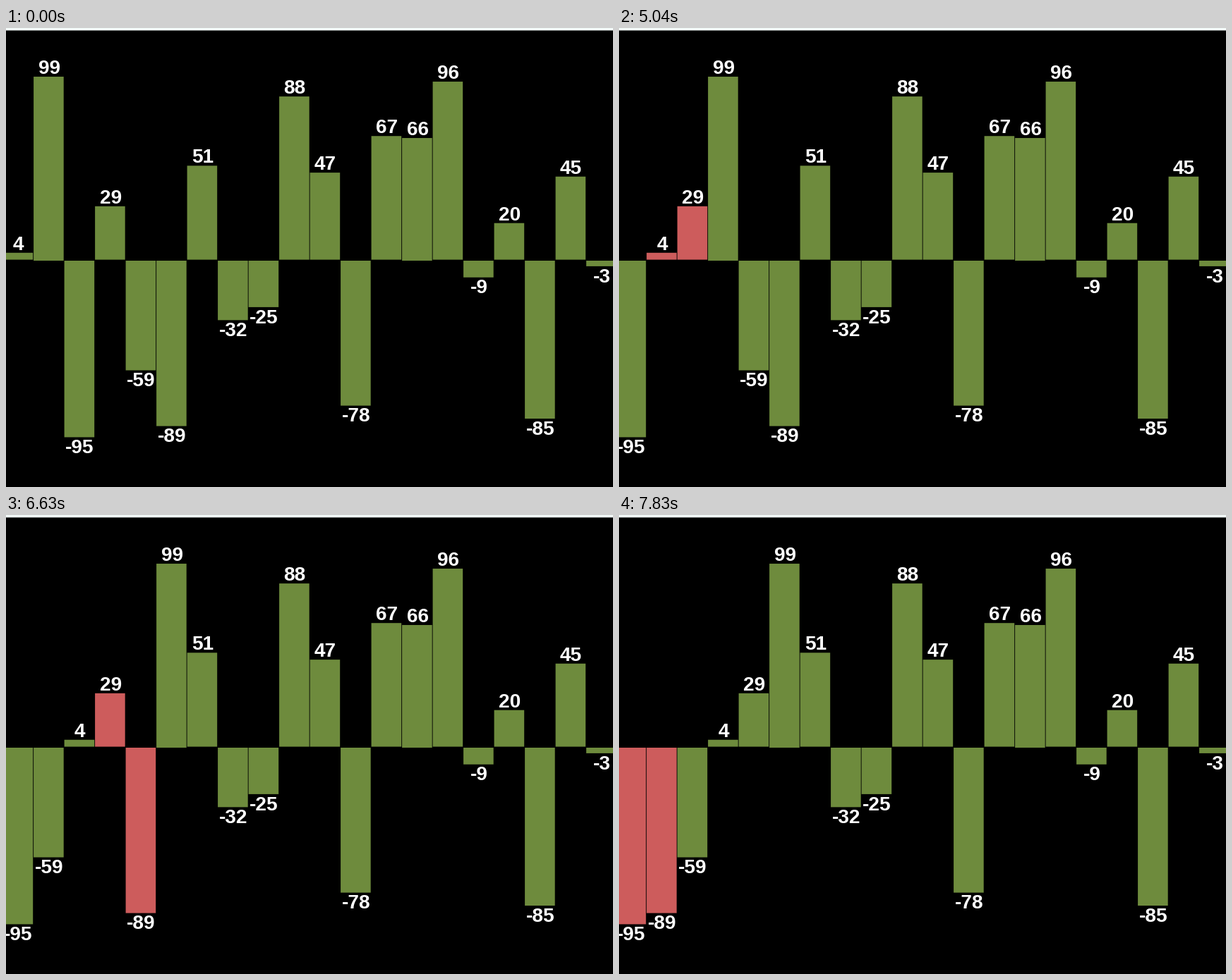
A matplotlib script for the animation above (8 s loop, 860x651 px).

```python
import numpy as np
import matplotlib.pyplot as plt
from matplotlib.animation import FuncAnimation
from matplotlib.patches import Polygon, Rectangle

W, H, DPI = 860, 651, 64
LOOP, TICK = 8000, 20
GREEN, RED = "#6e8b3d", "#cd5c5c"
PITCH, BAR_W, LEFT = 43.5, 42.6, -4.4
MID, ZOOM, UNIT = 330, 1.403, 62 / 33

VALUES = [4, 99, -95, 29, -59, -89, 51, -32, -25, 88,
          47, -78, 67, 66, 96, -9, 20, -85, 45, -3]
STEP_TIMES = [4240, 4640, 5040, 5440, 5830, 6240, 6630, 7030, 7430, 7830]


def insertion_steps(values):
    """Yield (list, highlighted indices) after every swap."""
    a = list(values)
    for i in range(1, len(a)):
        while i > 0 and a[i - 1] > a[i]:
            a[i - 1], a[i] = a[i], a[i - 1]
            i -= 1
            yield list(a), {i - 1, i}


def bar_span(v):
    """Top and bottom of a bar, cut to whole cells before zooming."""
    size = round(abs(v) * UNIT, 6)
    if v < 0:
        return MID, MID + size * ZOOM
    top = np.ceil(size)
    return MID - top * ZOOM, MID - (top - np.floor(size)) * ZOOM


def pointer_x(t):
    """Pointer peeks in from the left edge, rests and leaves."""
    if not 910 <= t < 1640:
        return -40
    into = np.interp(t, [910, 1240], [0.25, 1])
    away = np.interp(t, [1510, 1640], [0, 1])
    return -16 + 12 * (1 - (1 - into) ** 2) - 12 * away


states = [(VALUES, set())]
for state, _ in zip(insertion_steps(VALUES), STEP_TIMES):
    states.append(state)

plt.rcParams["font.family"] = "Liberation Sans"
fig = plt.figure(figsize=(W / DPI, H / DPI), dpi=DPI, facecolor="black")
ax = fig.add_axes([0, 0, 1, 1])
ax.set_xlim(0, W)
ax.set_ylim(H, 0)
ax.axis("off")
ax.add_patch(Rectangle((0, 0), W, 3.5, fc="#f3fbf9", lw=0, snap=False))

bars, labels = [], []
for k in range(len(VALUES)):
    x = LEFT + PITCH * k
    bars.append(ax.add_patch(Rectangle((x, MID), BAR_W, 0, lw=0, snap=False)))
    labels.append(ax.text(x + 22, 0, "", color="white", weight="bold",
                          fontsize=28 * 72 / DPI, ha="center", va="baseline"))

ARROW = np.array([(0, 0), (0, 22), (5, 17.5), (9, 27), (12.5, 25.5),
                  (8.5, 16), (15, 16)])
pointer = ax.add_patch(Polygon(ARROW, fc="black", ec="white", lw=1.2, zorder=5))


def draw(n):
    t = n * TICK + TICK - 1
    values, marked = states[sum(t >= s for s in STEP_TIMES)]
    for k, (v, bar, label) in enumerate(zip(values, bars, labels)):
        top, bottom = bar_span(v)
        bar.set_y(top)
        bar.set_height(bottom - top)
        bar.set_facecolor(RED if k in marked else GREEN)
        label.set_text(str(v))
        label.set_y(bottom + 22.7 if v < 0 else top - 4)
    pointer.set_xy(ARROW + (pointer_x(t), 622))
    return [*bars, *labels, pointer]


anim = FuncAnimation(fig, draw, frames=LOOP // TICK, interval=TICK,
                     repeat=True, repeat_delay=0, blit=False)
plt.show()
```
